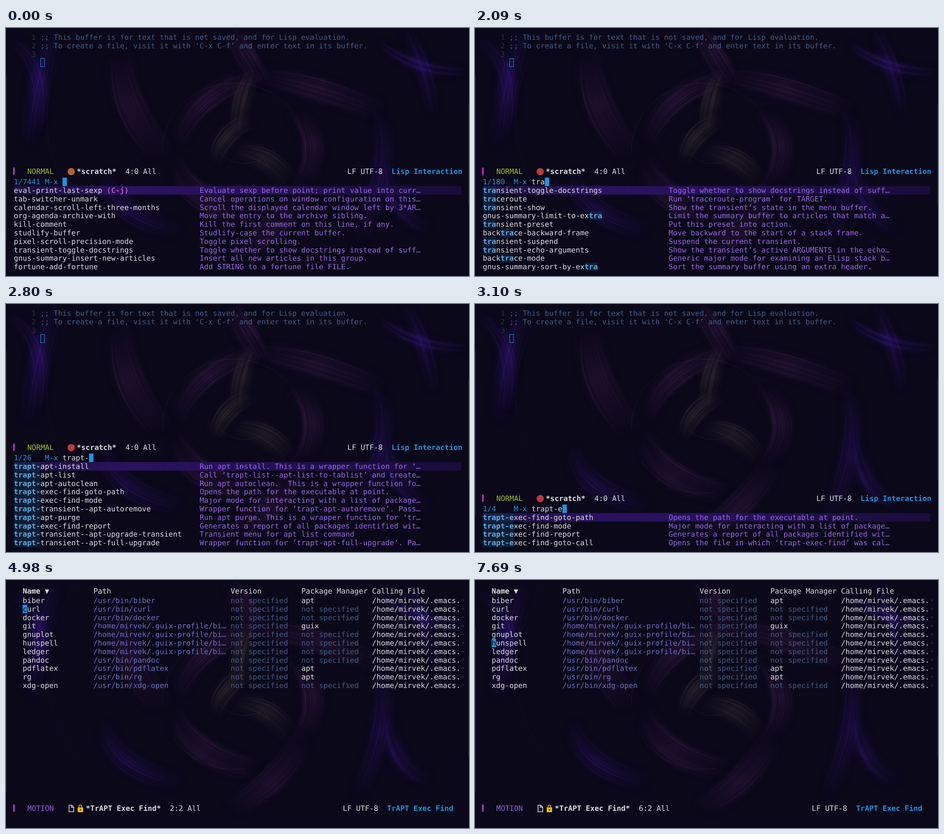
Animation of 1021x549 px, one loop 8 s. Source, as an HTML page with a canvas:

```html
<!DOCTYPE html>
<html>
<head>
<meta charset="utf-8">
<style>
html, body { margin: 0; width: 100%; height: 100%; overflow: hidden; background: #0a0819; }
canvas { display: block; }
</style>
</head>
<body>
<canvas id="stage" width="1021" height="549"></canvas>
<script>
const W = 1021, H = 549, LOOP = 8000;
const COL = 9.753, ROW = 18.8, LEFT = 17.3;
const FONT = '16.2px "DejaVu Sans Mono", monospace';
const FG = '#dcdce2', BLUE = '#1e94e0', DIM = '#465a82', VIOLET = '#9966e4', PATH = '#6c6fc2';
const PINK = '#e526e2', DARK = '#0c0a20';
const ctx = document.getElementById('stage').getContext('2d');

const commands = `eval-print-last-sexp|Evaluate sexp before point; print value into curr…|(C-j)
tab-switcher-unmark|Cancel operations on window configuration on this…
calendar-scroll-left-three-months|Scroll the displayed calendar window left by 3*AR…
org-agenda-archive-with|Move the entry to the archive sibling.
kill-comment|Kill the first comment on this line, if any.
studlify-buffer|Studlify-case the current buffer.
pixel-scroll-precision-mode|Toggle pixel scrolling.
transient-toggle-docstrings|Toggle whether to show docstrings instead of suff…
gnus-summary-insert-new-articles|Insert all new articles in this group.
fortune-add-fortune|Add STRING to a fortune file FILE.
traceroute|Run ‘traceroute-program’ for TARGET.
transient-show|Show the transient’s state in the menu buffer.
gnus-summary-limit-to-extra|Limit the summary buffer to articles that match a…
transient-preset|Put this preset into action.
backtrace-backward-frame|Move backward to the start of a stack frame.
transient-suspend|Suspend the current transient.
transient-echo-arguments|Show the transient’s active ARGUMENTS in the echo…
backtrace-mode|Generic major mode for examining an Elisp stack b…
gnus-summary-sort-by-extra|Sort the summary buffer using an extra header.
trapt-apt-install|Run apt install. This is a wrapper function for ‘…
trapt-apt-list|Call ’trapt-list--apt-list-to-tablist’ and create…
trapt-apt-autoclean|Run apt autoclean.  This is a wrapper function fo…
trapt-exec-find-goto-path|Opens the path for the executable at point.
trapt-exec-find-mode|Major mode for interacting with a list of package…
trapt-transient--apt-autoremove|Wrapper function for ’trapt-apt-autoremove’. Pass…
trapt-apt-purge|Run apt purge. This is a wrapper function for ‘tr…
trapt-exec-find-report|Generates a report of all packages identified wit…
trapt-transient--apt-upgrade-transient|Transient menu for apt list command
trapt-transient--apt-full-upgrade|Wrapper function for ’trapt-apt-full-upgrade’. Pa…
trapt-exec-find-goto-call|Opens the file in which ‘trapt-exec-find’ was cal…`
  .split('\n').map(line => line.split('|'));

const packages = 'biber:apt curl docker git:guix gnuplot hunspell ledger pandoc pdflatex:apt rg:apt xdg-open'
  .split(' ').map(item => item.split(':'));
const inProfile = ['git', 'gnuplot', 'hunspell', 'ledger'];

const prompt = (at, count, input, selected = 0) => ({ at, count, input, selected });
const report = (at, line, column = 2) => ({ at, line, column });
const steps = [
  prompt(0, '1/7441', ''), prompt(1000, '1/5210', 't'), prompt(2090, '1/180', 'tra'),
  prompt(2500, '1/26', 'trap'), prompt(2650, '1/26', 'trapt'), prompt(2800, '1/26', 'trapt-'),
  prompt(3100, '1/4', 'trapt-e'), prompt(3350, '1/4', 'trapt-ex'),
  prompt(3710, '2/4', 'trapt-ex', 1), prompt(4260, '3/4', 'trapt-ex', 2),
  report(4530, 1, 0), report(4980, 2), report(6830, 3), report(7130, 4), report(7690, 6)
];

const wallpaper = paintWallpaper();

function paintWallpaper() {
  const canvas = document.createElement('canvas');
  canvas.width = W;
  canvas.height = H;
  const c = canvas.getContext('2d');
  let seed = 7;
  const random = () => (seed = seed * 16807 % 2147483647) / 2147483647;
  const indigo = '62,24,150', plum = '92,38,104', olive = '92,78,72';

  c.fillStyle = '#0a0819';
  c.fillRect(0, 0, W, H);

  // A bundle of hairs along a quadratic curve, over a soft glow
  function strands(x0, y0, cx, cy, x1, y1, width, color) {
    const length = Math.hypot(x1 - x0, y1 - y0);
    const nx = (y0 - y1) / length, ny = (x1 - x0) / length;
    const fade = alpha => {
      const g = c.createLinearGradient(x0, y0, x1, y1);
      g.addColorStop(0, `rgba(${color},0)`);
      g.addColorStop(.45, `rgba(${color},${alpha})`);
      g.addColorStop(1, `rgba(${color},0)`);
      return g;
    };
    const curve = (o, alpha, thickness) => {
      c.strokeStyle = fade(alpha);
      c.lineWidth = thickness;
      c.beginPath();
      c.moveTo(x0 + nx * o * .4, y0 + ny * o * .4);
      c.quadraticCurveTo(cx + nx * o, cy + ny * o, x1 + nx * o * .6, y1 + ny * o * .6);
      c.stroke();
    };
    c.filter = 'blur(9px)';
    curve(0, .2, width * .8);
    c.filter = 'none';
    for (let i = 0; i < 16; i++) curve((random() - .5) * width * 1.3, .04 + random() * .14, .7 + random() * 2.5);
  }

  strands(110, 0, 60, 130, 50, 270, 46, indigo);
  strands(0, 20, 100, 70, 70, 240, 34, indigo);
  strands(250, 50, 250, 180, 350, 290, 70, plum);
  strands(380, 260, 400, 150, 570, 95, 50, plum);
  strands(490, 0, 530, 60, 570, 130, 50, plum);
  strands(545, 95, 515, 150, 510, 235, 42, olive);
  strands(550, 105, 670, 120, 840, 190, 56, plum);
  strands(630, 180, 720, 260, 640, 360, 50, plum);
  strands(880, 0, 930, 90, 942, 200, 30, indigo);
  strands(820, 30, 900, 100, 1021, 97, 24, indigo);
  strands(820, 180, 860, 310, 770, 490, 44, indigo);
  strands(840, 300, 850, 420, 940, 450, 40, indigo);
  strands(210, 310, 230, 420, 390, 450, 48, indigo);
  strands(370, 290, 410, 400, 560, 420, 60, plum);
  strands(490, 510, 610, 450, 660, 340, 60, plum);
  strands(460, 300, 470, 235, 545, 200, 40, olive);
  strands(500, 270, 590, 280, 630, 350, 50, olive);

  c.strokeStyle = 'rgba(88,70,96,.24)';
  c.lineWidth = 1;
  const arc = (x, y, rx, ry, from, to) => {
    c.beginPath();
    c.ellipse(x, y, rx, ry, 0, from, to);
    c.stroke();
  };
  arc(503, 272, 158, 150, 3.1, 6.6);
  arc(503, 272, 158, 147, 1.4, 2.6);
  arc(525, 250, 62, 50, .6, 2.6);
  c.strokeStyle = 'rgba(60,30,120,.25)';
  arc(380, 200, 290, 300, 2.4, 3.9);
  arc(525, 280, 308, 260, 5.9, 6.6);

  c.fillStyle = '#1c1d22';
  c.fillRect(0, 104, 2, 364);
  c.fillRect(1019, 167, 2, 224);
  return canvas;
}

function text(string, x, top, color = FG, bold = false) {
  ctx.font = (bold ? 'bold ' : '') + FONT;
  ctx.fillStyle = color;
  ctx.fillText(string, x, top + 15);
}

const col = n => LEFT + n * COL;

function box(x, y, w, h, color) {
  ctx.fillStyle = color;
  ctx.fillRect(x, y, w, h);
}

function modeline(top, mode, modeColor, name, nameX, position, major, majorX, barColor = PINK) {
  box(16, top + 1, 3, 16, barColor);
  text(mode, 47, top, modeColor);
  text(name, nameX, top, FG, true);
  text(position + ' All', nameX + (name.length + 2) * COL, top);
  text('LF UTF-8', majorX - 10 * COL, top);
  text(major, majorX, top, BLUE, true);
}

function drawPrompt({ count, input, selected }) {
  [';; This buffer is for text that is not saved, and for Lisp evaluation.',
   ';; To create a file, visit it with ‘C-x C-f’ and enter text in its buffer.', '']
    .forEach((line, i) => {
      text(String(i + 1), col(4), 11 + i * ROW, '#2b2c45');
      text(line, col(6), 11 + i * ROW, DIM);
    });
  ctx.strokeStyle = BLUE;
  ctx.lineWidth = 1;
  ctx.strokeRect(76.5, 67.5, 8.5, 18);

  const rows = commands.filter(([name]) => name.includes(input)).slice(0, 10);
  const top = 350 + (10 - rows.length) * ROW;
  const idle = !input;
  modeline(top - 42, 'NORMAL', '#9cc51e', '*scratch*', 155.9, '4:0', 'Lisp Interaction', 850.3,
    idle ? '#c443c8' : PINK);
  ctx.fillStyle = idle ? '#b0622f' : '#ba3b39';
  ctx.beginPath();
  ctx.arc(143.8, top - 32, 8, 0, 7);
  ctx.fill();

  text(count.padEnd(6) + ' M-x', col(0), top - ROW, BLUE);
  text(input, col(11), top - ROW);
  box(col(11 + input.length), top - ROW, COL, ROW, BLUE);

  const glow = ctx.createLinearGradient(17, 0, 1004, 0);
  ['#1d1040', '#2b1260', '#27115a', '#1e0e46', '#1a0c3c'].forEach((c, i) => glow.addColorStop(i / 4, c));
  box(17, top + selected * ROW, 987, ROW, glow);

  rows.forEach(([name, summary, key], i) => {
    const y = top + i * ROW, start = name.indexOf(input), end = start + input.length;
    if (input) box(col(start), y, input.length * COL, ROW, 'rgba(18,48,78,.55)');
    text(name.slice(0, start), col(0), y);
    text(input, col(start), y, '#5cabe0', true);
    text(name.slice(end), col(end), y);
    if (key) text(key, col(name.length + 1), y, '#c04cc4', true);
    text(summary, col(42), y, VIOLET);
  });
}

function drawReport({ line, column }) {
  text('Name', col(2), 14.5, FG, true);
  text('▼', col(7), 14.5);
  [[18, 'Path'], [49, 'Version'], [65, 'Package Manager'], [81, 'Calling File']]
    .forEach(([n, title]) => text(title, col(n), 14.5));

  packages.forEach(([name, manager], i) => {
    const y = 36 + i * ROW;
    text(name, col(2), y);
    text(inProfile.includes(name) ? '/home/mirvek/.guix-profile/bi…' : '/usr/bin/' + name, col(18), y, PATH);
    text('not specified', col(49), y, DIM);
    text(manager || 'not specified', col(65), y, manager ? FG : DIM);
    text('/home/mirvek/.emacs.', col(81), y);
    ctx.strokeStyle = '#34364c';
    ctx.lineWidth = 1;
    ctx.stroke(new Path2D(`M1004 ${y + 9}h6m-3 -3l3 3l-3 3`));
  });

  const cursorY = 36 + (line - 1) * ROW;
  box(col(column), cursorY, COL, ROW, BLUE);
  if (column) text(packages[line - 1][0][0], col(column), cursorY, DARK);

  modeline(496, 'MOTION', '#9062da', '*TrAPT Exec Find*', 176, `${line}:${column}`, 'TrAPT Exec Find', 840.3);
  ctx.lineWidth = 1.6;
  ctx.strokeStyle = FG;
  ctx.stroke(new Path2D('M139 498.5h6l4.3 4.3v10.2h-10.3zM144.5 498.5v4.8h4.8'));
  box(158, 503.5, 12, 10.5, '#e5bf00');
  ctx.strokeStyle = '#e5bf00';
  ctx.stroke(new Path2D('M160.8 504v-2.5a3.2 3.2 0 0 1 6.4 0v2.5'));
  box(162.7, 507.5, 2.6, 2.6, DARK);
}

function draw(now) {
  const time = now % LOOP;
  const step = steps.findLast(s => s.at <= time);
  ctx.textRendering = 'geometricPrecision';
  ctx.drawImage(wallpaper, 0, 0);
  if (step.line) drawReport(step);
  else drawPrompt(step);
  requestAnimationFrame(draw);
}
requestAnimationFrame(draw);
</script>
</body>
</html>
```
